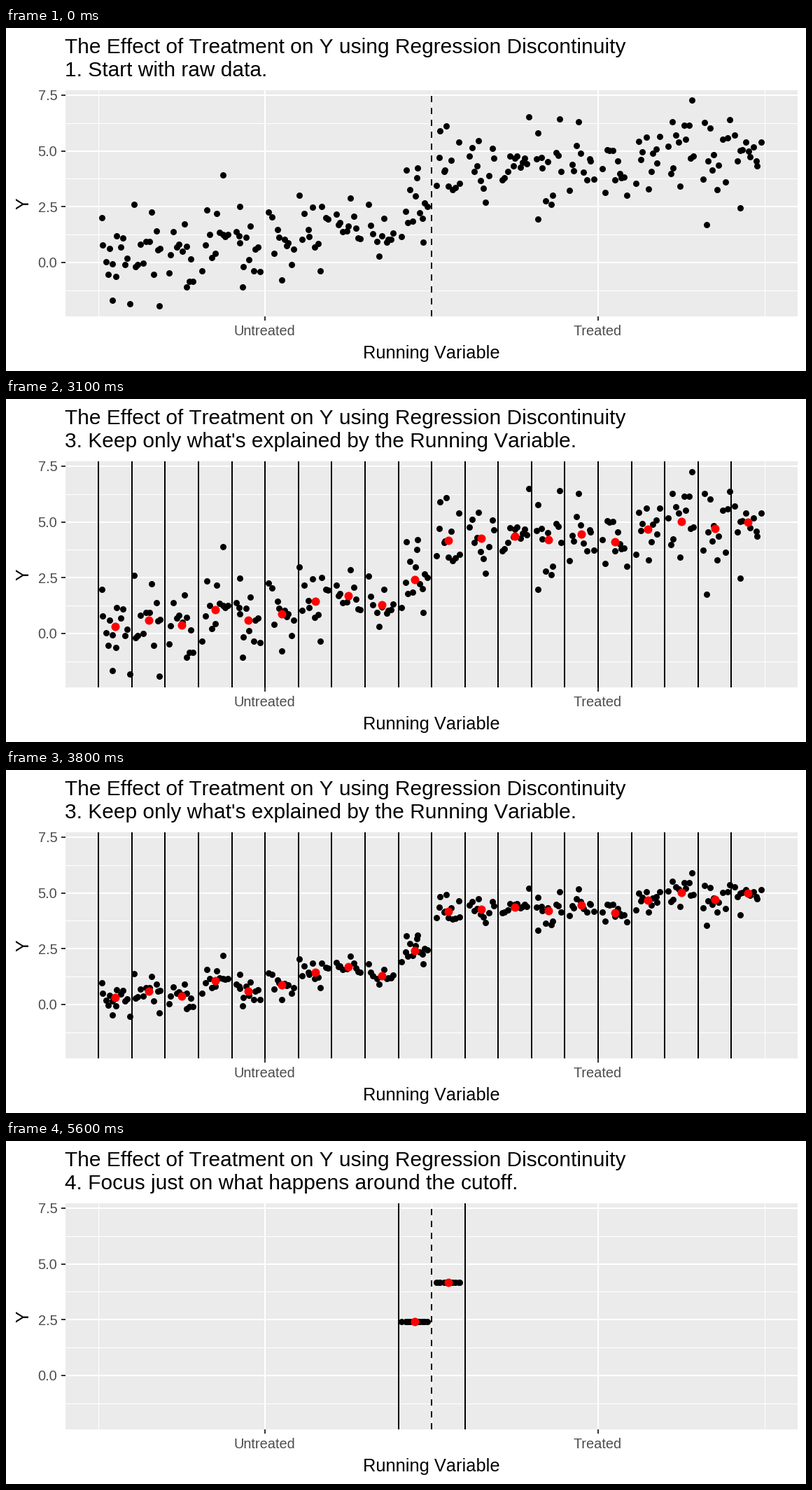
These frames come from a looping animation (1143 by 490 pixels, 8000 ms). A matplotlib script:

```python
import numpy as np
import matplotlib.pyplot as plt
from matplotlib.animation import FuncAnimation
from matplotlib.patches import Rectangle

W, H = 1143, 490
STEP, FRAMES = 100, 80          # ms per frame, frames per loop
LEFT, RIGHT, TOP, BOTTOM = 84.5, 1130.5, 89, 411.5
NBINS, PER_BIN = 20, 11

TITLE = "The Effect of Treatment on Y using Regression Discontinuity"
STEPS = [
    (0, "1. Start with raw data."),
    (500, "2. Figure out what differences in Y are explained by the Running Variable."),
    (3100, "3. Keep only what's explained by the Running Variable."),
    (5600, "4. Focus just on what happens around the cutoff."),
]

# mean of Y in each bin of the running variable
MEANS = np.array([0.3, 0.61, 0.38, 1.08, 0.61, 0.88, 1.45, 1.7, 1.3, 2.41,
                  4.17, 4.28, 4.36, 4.19, 4.44, 4.12, 4.69, 5.02, 4.72, 4.99])

# the extreme points: position in bins, Y
OUTLIERS = [
    (0.1, 2.0), (0.42, -1.7), (0.94, -1.86), (1.07, 2.62), (1.82, -1.95),
    (2.64, -1.1), (3.74, 3.92), (4.24, 2.5), (4.32, -1.1), (6.02, 3.0),
    (9.24, 4.13), (9.58, 4.23), (9.74, 0.92), (10.44, 6.12), (12.92, 6.53),
    (13.2, 1.96), (13.84, 6.43), (17.23, 6.3), (17.81, 7.27), (18.26, 1.71),
    (18.95, 6.4), (19.26, 2.45),
]


def x_px(u):
    return 132.2 + 47.59 * u


def y_px(v):
    return 335 - 31.87 * v


def make_points():
    rng = np.random.default_rng(7)
    u = np.arange(NBINS)[:, None] + np.linspace(0.12, 0.87, PER_BIN)
    u += rng.uniform(-0.03, 0.03, u.shape)
    noise = np.clip(rng.normal(0, 0.85, u.shape), -1.6, 1.6)
    noise -= noise.mean(axis=1, keepdims=True)
    cloud = np.column_stack([u.ravel(), (MEANS[:, None] + noise).ravel()])
    return np.vstack([cloud, OUTLIERS])


px, py = make_points().T
bins = px.astype(int)
near_cutoff = (bins == 9) | (bins == 10)

plt.rcParams["font.family"] = "Liberation Sans"
plt.rcParams["text.kerning_factor"] = 12    # large enough to switch kerning off
fig = plt.figure(figsize=(W / 72, H / 72), dpi=72, facecolor="white")
ax = fig.add_axes([0, 0, 1, 1])
ax.set_xlim(0, W)
ax.set_ylim(H, 0)
ax.axis("off")


def line(xs, ys, color, width, z=1, **kw):
    return ax.plot(xs, ys, color=color, lw=width, zorder=z, antialiased=False,
                   solid_capstyle="butt", dash_capstyle="butt", **kw)[0]


def hline(v, width):
    line([LEFT, RIGHT], [y_px(v)] * 2, "white", width)


def vline(u, color, width, z=1, **kw):
    return line([x_px(u)] * 2, [BOTTOM, TOP], color, width, z, **kw)


def label(x, y, s, size, color="black", **kw):
    return ax.text(x, y, s, fontsize=size, color=color, va="baseline", **kw)


ax.add_patch(Rectangle((LEFT, TOP), RIGHT - LEFT, BOTTOM - TOP,
                       fc="#EBEBEB", lw=0, zorder=0))
for v in np.arange(-1.25, 7, 2.5):
    hline(v, 1)
for u in (0, 10, 20):
    vline(u, "white", 1)
for v in np.arange(0, 8, 2.5):
    hline(v, 2)
    line([LEFT - 6, LEFT], [y_px(v)] * 2, "#333333", 2)
    label(73.5, y_px(v) + 7.5, f"{v:.1f}", 20, "#4D4D4D", ha="right")
for u, name in ((5, "Untreated"), (15, "Treated")):
    vline(u, "white", 2)
    line([x_px(u)] * 2, [BOTTOM, BOTTOM + 6], "#333333", 2)
    label(x_px(u) - 0.5, 439, name, 20, "#4D4D4D", ha="center")

label(84.5, 36.5, TITLE, 29.92)
subtitle = label(84.5, 69, "", 29.92)
label(607.5, 472, "Running Variable", 25.4, ha="center")
label(32, 250.5, "Y", 25, ha="center", rotation=90, rotation_mode="anchor")

dashed = vline(10, "black", 2, 4, dashes=(4, 4))
edges = [vline(k, "black", 2, 3) for k in range(NBINS)]
dots = ax.scatter([], [], s=9 ** 2, c="black", lw=0, zorder=2)
reds = ax.scatter([], [], s=12 ** 2, c="red", lw=0, zorder=5)


def draw(i):
    t = i * STEP
    subtitle.set_text([s for start, s in STEPS if t >= start][-1])
    binned, focus = t >= 1000, t >= 5600

    p = np.clip((t - 3000) / 1400, 0, 1)
    ease = (1 - np.cos(np.pi * p)) / 2
    y = py + (MEANS[bins] - py) * ease
    xy = np.column_stack([x_px(px), y_px(y)])
    dots.set_offsets(xy[near_cutoff] if focus else xy)

    k = np.arange(9, 11) if focus else np.arange(NBINS if binned else 0)
    reds.set_offsets(np.column_stack([x_px(k + 0.5), y_px(MEANS[k])]))
    for n, edge in enumerate(edges):
        edge.set_visible(n in (9, 11) if focus else binned)
    dashed.set_visible(focus or not binned)
    return dots, reds, subtitle, dashed, *edges


anim = FuncAnimation(fig, draw, frames=FRAMES, interval=STEP,
                     repeat=True, repeat_delay=0, blit=False)
plt.show()
```
